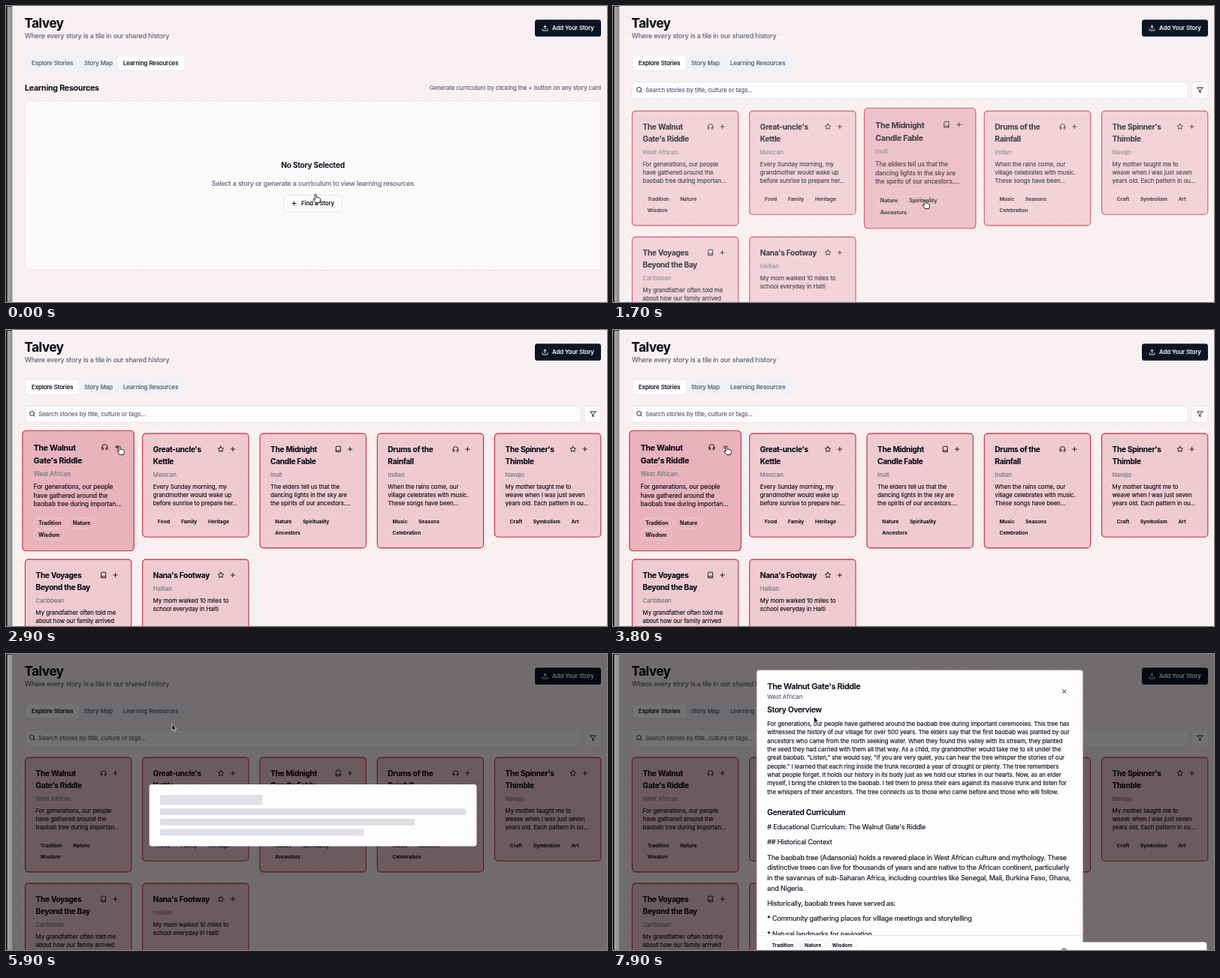
An HTML page for the animation above (8 s loop, 800 by 395 pixels).

```html
<!DOCTYPE html>
<html lang="en">
<head>
<meta charset="utf-8">
<title>Story collection</title>
<style>
html, body { margin: 0; width: 100%; height: 100%; overflow: hidden; background: #f9f0f2; }
svg { display: block; width: 800px; height: 395px; }
text {
  font-family: Inter, "Open Sans", sans-serif; white-space: pre;
  color: #0b0f1a; fill: currentColor; stroke: currentColor; stroke-width: .14px;
}
.logo { font-size: 17px; font-weight: 700; letter-spacing: -.025em; }
.lead { font-size: 9px; letter-spacing: -.0185em; }
.h2 { font-size: 10.9px; font-weight: 600; letter-spacing: -.03em; }
.h3 { font-size: 10.1px; font-weight: 600; letter-spacing: -.02em; }
.title { font-size: 10.1px; font-weight: 650; letter-spacing: -.028em; }
.small { font-size: 7.9px; letter-spacing: -.0105em; }
.label { font-size: 7.9px; font-weight: 500; letter-spacing: -.012em; }
.tag { font-size: 6.75px; font-weight: 600; }
.muted { color: #6b7686; }
.slate { color: #566074; }
.light { color: #fff; }
.icon { fill: none; stroke: #0b0f1a; stroke-width: 2.4; stroke-linecap: round; stroke-linejoin: round; }
</style>
</head>
<body>
<svg id="stage" viewBox="0 0 800 395">
  <defs>
    <pattern id="plus" width="22.5" height="22.5" patternUnits="userSpaceOnUse" x="8" y="4">
      <path d="M11 8.500v5M8.500 11h5" stroke="#dc506e" stroke-opacity=".05" stroke-width="1.5"/>
    </pattern>
    <linearGradient id="edge">
      <stop stop-color="#b3b0b0"/><stop offset="1" stop-color="#8d8a8a"/>
    </linearGradient>
    <clipPath id="scrollArea"><path d="M192 66H625V375H192z"/></clipPath>
  </defs>
</svg>
<script>
const LOOP = 8000;
const stage = document.getElementById('stage');
const clamp = v => Math.max(0, Math.min(1, v));
const ramp = (t, start, length) => clamp((t - start) / length);
const easeOut = p => 1 - (1 - p) ** 3;
const smooth = p => p * p * (3 - 2 * p);

function add(parent, name, attrs = {}) {
  const node = document.createElementNS('http://www.w3.org/2000/svg', name);
  for (const key in attrs) node.setAttribute(key, attrs[key]);
  return parent.appendChild(node);
}
const group = (parent, attrs) => add(parent, 'g', attrs);
const box = (parent, x, y, width, height, rx, fill, stroke = 'none', more = {}) =>
  add(parent, 'rect', { x, y, width, height, rx, fill, stroke, ...more });
function label(parent, x, y, content, cls, more = {}) {
  const node = add(parent, 'text', { x, y, class: cls, ...more });
  node.textContent = content;
  return node;
}
const lines = (parent, x, y, step, rows, cls) =>
  rows.forEach((row, i) => label(parent, x, y + i * step, row, cls));

const ICONS = {
  plus: 'M5 12h14M12 5v14',
  close: 'M18 6L6 18M6 6l12 12',
  upload: 'M21 15v4a2 2 0 0 1-2 2H5a2 2 0 0 1-2-2v-4M17 8l-5-5-5 5M12 3v12',
  search: 'M19 11a8 8 0 1 1-16 0 8 8 0 0 1 16 0zM21 21l-4.3-4.3',
  filter: 'M22 3H2l8 9.5V19l4 2v-8.5z',
  audio: 'M3 14h3a2 2 0 0 1 2 2v3a2 2 0 0 1-2 2H5a2 2 0 0 1-2-2v-7a9 9 0 0 1 18 0v7a2 2 0 0 1-2 2h-1a2 2 0 0 1-2-2v-3a2 2 0 0 1 2-2h3',
  star: 'M12 2l3.1 6.3 6.9 1-5 4.9 1.2 6.8-6.2-3.2L5.8 21 7 14.2 2 9.3l6.9-1z',
  book: 'M4 19.5V4.5A2.5 2.5 0 0 1 6.5 2H20v20H6.5a2.5 2.5 0 0 1 0-5H20'
};
function icon(parent, name, cx, cy, size = 9, more = {}) {
  const g = group(parent, { transform: `translate(${cx} ${cy}) scale(${size / 24})` });
  return add(g, 'path', { d: ICONS[name], class: 'icon', transform: 'translate(-12 -12)', ...more });
}

// Lays pills out in a row; widths follow from the text.
function pills(parent, x, y, names, stroke) {
  return names.map(name => {
    const pill = box(parent, x, y - 9, 10, 13, 6.5, 'none', stroke, { 'stroke-width': .7 });
    const width = label(parent, x + 6.2, y, name, 'tag').getComputedTextLength() + 12.4;
    pill.setAttribute('width', width);
    x += width + 2.25;
    return pill;
  });
}

// Page frame
box(stage, 0, 0, 800, 395, 0, '#f9f0f2');
box(stage, 8, 0, 792, 395, 0, 'url(#plus)');
label(stage, 24.5, 29, 'Talvey', 'logo');
label(stage, 25, 43.3, 'Where every story is a tile in our shared history', 'lead slate');
box(stage, 704, 18.3, 88, 22.5, 3.4, '#0c1524');
icon(stage, 'upload', 717.5, 29.5, 9, { style: 'stroke:#fff' });
label(stage, 727, 32.4, 'Add Your Story', 'label light');
box(stage, 25, 65, 214, 22.5, 3.4, '#eef1f6');
const activeTab = box(stage, 149, 67.2, 88, 18, 2.5, '#fff');
const tabs = [['Explore Stories', 34], ['Story Map', 104], ['Learning Resources', 156]]
  .map(([name, x]) => label(stage, x, 79, name, 'label'));

// Learning resources view
const learning = group(stage);
label(learning, 25, 112.8, 'Learning Resources', 'h2');
label(learning, 792, 112, 'Generate curriculum by clicking the + button on any story card', 'small slate', { 'text-anchor': 'end' });
box(learning, 25, 126.5, 767, 226, 4.5, 'rgba(255,255,255,.6)', '#e2e8f0');
label(learning, 408.5, 215.6, 'No Story Selected', 'h3', { 'text-anchor': 'middle' });
label(learning, 408.5, 239.6, 'Select a story or generate a curriculum to view learning resources', 'lead slate', { 'text-anchor': 'middle' });
box(learning, 369.5, 252.5, 78, 22, 3.4, '#fdfafb', '#e2e8f0');
icon(learning, 'plus', 383.5, 263.5);
label(learning, 393, 266.4, 'Find a Story', 'label');

// Story cards view
const explore = group(stage);
box(explore, 25, 101.5, 740, 22, 3.4, 'rgba(255,255,255,.72)', '#e2e8f0');
icon(explore, 'search', 35, 111.8);
label(explore, 43.3, 115.3, 'Search stories by title, culture or tags...', 'small slate');
box(explore, 770, 101.5, 22, 22, 3.4, 'rgba(255,255,255,.72)', '#e2e8f0');
icon(explore, 'filter', 781.3, 112.3);
const deck = group(explore);

const STORIES = [
  { title: ['The Walnut', "Gate's Riddle"], culture: 'West African', mark: 'audio',
    body: ['For generations, our people', 'have gathered around the', 'baobab tree during importan...'],
    tags: [['Tradition', 'Nature'], ['Wisdom']] },
  { title: ["Great-uncle's", 'Kettle'], culture: 'Mexican', mark: 'star',
    body: ['Every Sunday morning, my', 'grandmother would wake up', 'before sunrise to prepare her...'],
    tags: [['Food', 'Family', 'Heritage']] },
  { title: ['The Midnight', 'Candle Fable'], culture: 'Inuit', mark: 'book',
    body: ['The elders tell us that the', 'dancing lights in the sky are', 'the spirits of our ancestors....'],
    tags: [['Nature', 'Spirituality'], ['Ancestors']] },
  { title: ['Drums of the', 'Rainfall'], culture: 'Indian', mark: 'audio',
    body: ['When the rains come, our', 'village celebrates with music.', 'These songs have been...'],
    tags: [['Music', 'Seasons'], ['Celebration']] },
  { title: ["The Spinner's", 'Thimble'], culture: 'Navajo', mark: 'star',
    body: ['My mother taught me to', 'weave when I was just seven', 'years old. Each pattern in ou...'],
    tags: [['Craft', 'Symbolism', 'Art']] },
  { title: ['The Voyages', 'Beyond the Bay'], culture: 'Caribbean', mark: 'book',
    body: ['My grandfather often told me', 'about how our family arrived'], tags: [[], []] },
  { title: ["Nana's Footway"], culture: 'Haitian', mark: 'star',
    body: ['My mom walked 10 miles to', 'school everyday in Haiti'], tags: [[], []] }
];
const CARD_W = 142.3;
const cards = STORIES.map((story, i) => {
  const x = 25 + (i % 5) * 156.25, y = i < 5 ? 137.6 : 305.6;
  const height = 124.4 + story.tags.length * 14.7;
  const g = group(deck);
  const inner = group(g, { transform: `translate(${x} ${y})` });
  const face = box(inner, .5, .5, CARD_W - 1, height - 1, 4.5, '#c8324b', '#c9293f', { 'stroke-width': 1.1 });
  const drop = (story.title.length - 1) * 16;
  lines(inner, 14.6, 25.9, 16, story.title, 'title');
  icon(inner, story.mark, 104.7, 21.4);
  const plus = icon(inner, 'plus', 120.6, 21.4);
  label(inner, 14.6, 42.2 + drop, story.culture, 'small muted');
  lines(inner, 14.6, 58.2 + drop, 11.3, story.body, 'small');
  const rims = story.tags.flatMap((row, r) => pills(inner, 14.6, 120.7 + r * 14.7, row, '#fff'));
  return { g, face, plus, rims, cx: x + CARD_W / 2, cy: y + height / 2 };
});

// Dimming and window edge
const shade = box(stage, 8, 0, 792, 395, 0, '#000');
box(stage, 0, 0, 8.5, 395, 0, 'url(#edge)');
box(stage, 0, 0, 1.6, 395, 0, '#0a0a0a');
box(stage, 0, 0, 8, 1, 0, '#333');

// Loading dialog
const loading = group(stage);
box(loading, 190.7, 174, 435.8, 82.5, 3.4, '#fdfdfe');
const bones = group(loading);
[[188, 136, 13.5], [206, 407.5, 9], [219.7, 339.5, 9], [233.4, 271.5, 9]]
  .forEach(([y, w, h]) => box(bones, 204.9, y, w, h, 2.2, '#dfdfe7'));

// Story dialog
const dialog = group(stage);
box(dialog, 191.2, 21.4, 434.4, 387.4, 3.4, '#fdfdfe', '#cf938f', { 'stroke-dasharray': '2 1' });
label(dialog, 205.3, 47, "The Walnut Gate's Riddle", 'h2');
label(dialog, 205.3, 59.6, 'West African', 'small slate');
icon(dialog, 'close', 600.6, 50);
const page = group(dialog, { 'clip-path': 'url(#scrollArea)' });
label(page, 205.3, 78.2, 'Story Overview', 'h3');
lines(page, 205.3, 96, 11.35, [
  'For generations, our people have gathered around the baobab tree during important ceremonies. This tree has',
  'witnessed the history of our village for over 500 years. The elders say that the first baobab was planted by our',
  'ancestors who came from the north seeking water. When they found this valley with its stream, they planted',
  'the seed they had carried with them all that way. As a child, my grandmother would take me to sit under the',
  'great baobab. "Listen," she would say, "if you are very quiet, you can hear the tree whisper the stories of our',
  'people." I learned that each ring inside the trunk recorded a year of drought or plenty. The tree remembers',
  'what people forget. It holds our history in its body just as we hold our stories in our hearts. Now, as an elder',
  'myself, I bring the children to the baobab. I tell them to press their ears against its massive trunk and listen for',
  'the whispers of their ancestors. The tree connects us to those who came before and those who will follow.'
], 'small');
label(page, 205.3, 214.6, 'Generated Curriculum', 'h3');
label(page, 205.3, 233.9, "# Educational Curriculum: The Walnut Gate's Riddle", 'lead');
label(page, 205.3, 254.3, '## Historical Context', 'lead');
lines(page, 205.3, 274.8, 13.6, [
  'The baobab tree (Adansonia) holds a revered place in West African culture and mythology. These',
  'distinctive trees can live for thousands of years and are native to the African continent, particularly',
  'in the savannas of sub-Saharan Africa, including countries like Senegal, Mali, Burkina Faso, Ghana,',
  'and Nigeria.'
], 'lead');
lines(page, 205.3, 335.8, 20.4, [
  'Historically, baobab trees have served as:',
  '* Community gathering places for village meetings and storytelling',
  '* Natural landmarks for navigation'
], 'lead');
add(dialog, 'path', { d: 'M192 375.5H625', stroke: '#e5e7ee' });
pills(dialog, 205.3, 391, ['Tradition', 'Nature', 'Wisdom'], '#dbe1ea');
const toast = group(stage);
box(toast, 596, 384.4, 194.4, 30, 3.4, '#fff');
add(toast, 'path', { d: 'M597.5 395.5a3 2.2 0 0 1 6 0', class: 'icon', style: 'stroke-width:1' });

// Pointers, with the tip at the origin
const hand = add(stage, 'path', {
  d: 'M-1 1Q-1 0 0 0T1.1 1L1.3 4.5 2.7 4.2 4.3 4.7 5.7 5.2Q6.7 5.8 6.5 7.5L5.6 11.5H.3L-2.8 7.5Q-3.3 6.3-2.3 6.1L-.7 7.2z',
  fill: '#fff', stroke: '#111', 'stroke-width': .9, 'stroke-linejoin': 'round'
});
const arrow = add(stage, 'path', {
  d: 'M0 0V8.5L1.9 6.9 3.2 9.8 4.6 9.2 3.3 6.4H5.8z',
  fill: '#000', stroke: '#fff', 'stroke-width': .7
});

const PATH = [ // time, x, y
  [0, 412, 251], [600, 412, 251], [1150, 415, 259], [1900, 415, 259], [2300, 161.5, 157],
  [2800, 151, 155], [3950, 151, 155], [4900, 221, 93.5], [6700, 221, 93.5], [7600, 267.5, 83.5]
];
function pointerAt(t) {
  const i = PATH.findIndex(p => p[0] > t);
  if (i < 0) return PATH[PATH.length - 1].slice(1);
  const [t0, x0, y0] = PATH[i - 1], [t1, x1, y1] = PATH[i];
  const p = smooth((t - t0) / (t1 - t0));
  return [x0 + (x1 - x0) * p, y0 + (y1 - y0) * p];
}

const OPEN = 1450, SHADE = 5550, LOADED = 6500;
const HOVERS = { 2: [1490, 2050], 1: [2060, 2290], 0: [2300, 4250] };
const show = (node, on) => node.setAttribute('visibility', on ? 'visible' : 'hidden');

function hoverAt(i, t) {
  if (!HOVERS[i]) return 0;
  const [on, off] = HOVERS[i];
  return easeOut(ramp(t, on, 220)) * (1 - easeOut(ramp(t, off, 220)));
}

function zoomIn(node, p) {
  const s = .95 + .05 * p;
  node.setAttribute('transform', `translate(408.6 215.2) scale(${s}) translate(-408.6 -215.2)`);
  node.setAttribute('opacity', p);
}

function draw(t) {
  const exploring = t >= OPEN;
  show(learning, !exploring);
  show(explore, exploring);
  activeTab.setAttribute('x', exploring ? 27 : 149);
  activeTab.setAttribute('width', exploring ? 70 : 88);
  tabs.forEach((tab, i) => tab.style.color = i === (exploring ? 0 : 2) ? '#0b0f1a' : '#566074');

  const enter = ramp(t, OPEN, 500);
  deck.setAttribute('opacity', 1 - (1 - enter) ** 2);
  deck.setAttribute('transform', `translate(0 ${16 * (1 - enter) ** 3})`);
  cards.forEach((card, i) => {
    const h = hoverAt(i, t);
    card.g.setAttribute('transform',
      `translate(${card.cx} ${card.cy}) scale(${1 + .05 * h}) translate(${-card.cx} ${-card.cy})`);
    card.face.setAttribute('fill-opacity', .2 + .12 * h);
    card.rims.forEach(rim => rim.setAttribute('stroke-opacity', .05 + .3 * h));
  });
  const busy = t >= 3650 && t < SHADE;
  cards[0].plus.setAttribute('transform', `rotate(${busy ? (t - 3650) * .36 : 0}) translate(-12 -12)`);
  cards[0].plus.setAttribute('opacity', busy ? .5 : 1);

  shade.setAttribute('opacity', .55 * ramp(t, SHADE, 200));
  show(loading, t >= SHADE && t < LOADED);
  zoomIn(loading, easeOut(ramp(t, SHADE, 220)));
  bones.setAttribute('opacity', .75 + .25 * Math.cos((t - 5900) * Math.PI / 1000));
  show(dialog, t >= LOADED);
  show(toast, t >= LOADED + 300);
  toast.setAttribute('transform', `translate(0 ${12 * (1 - easeOut(ramp(t, LOADED + 300, 250)))})`);

  const [x, y] = pointerAt(t), pointing = t < 4350;
  show(hand, pointing);
  show(arrow, !pointing);
  (pointing ? hand : arrow).setAttribute('transform', `translate(${x} ${y})`);
}

const start = performance.now();
function tick() {
  draw((performance.now() - start) % LOOP);
  requestAnimationFrame(tick);
}
tick();
</script>
</body>
</html>
```
